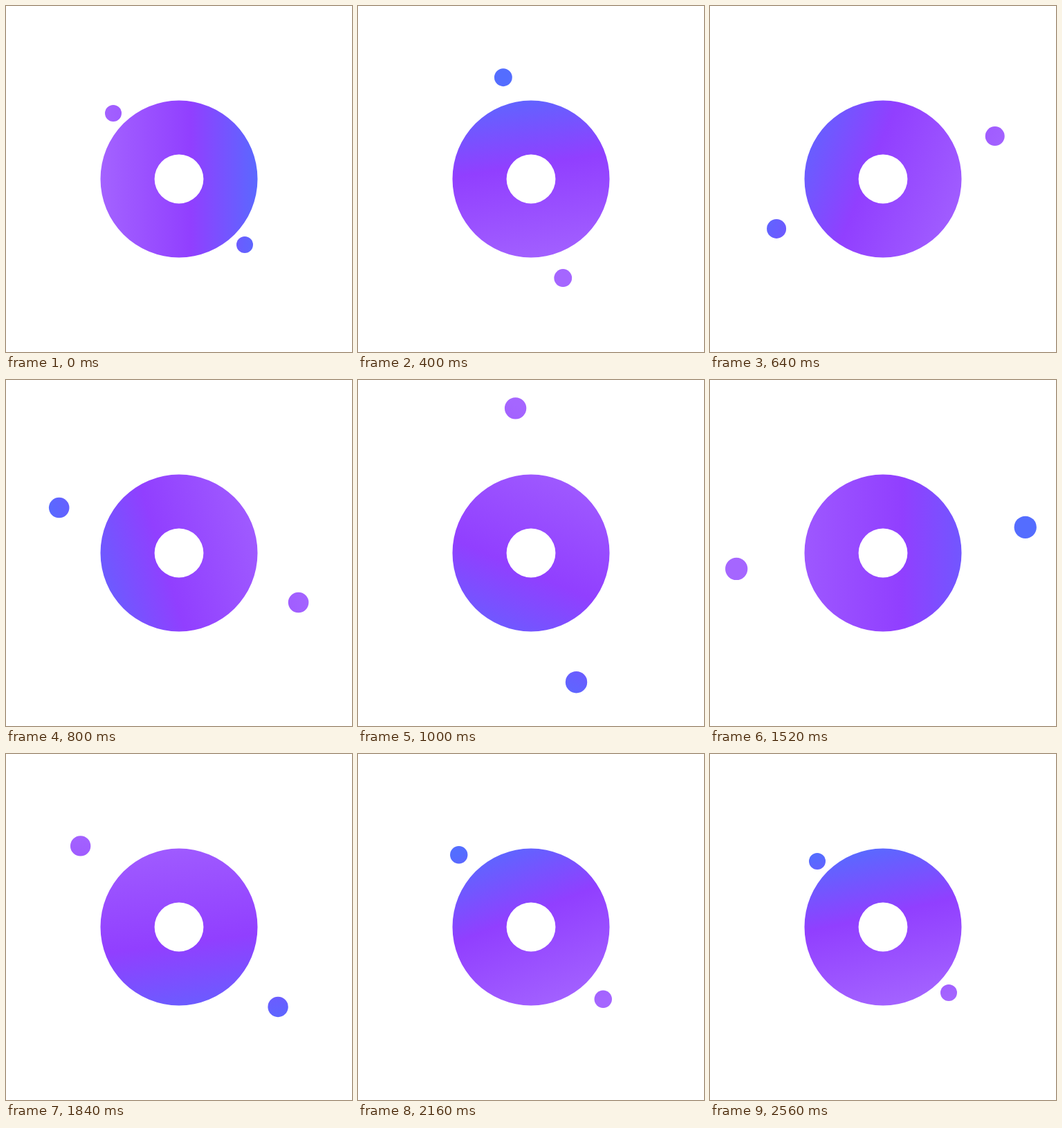
An HTML page with a canvas for the animation above (2.6 s loop, 500x500 px).

```html
<!DOCTYPE html>
<html lang="en">
<head>
<meta charset="utf-8">
<title>Orbiting ring</title>
<style>
  html, body { margin: 0; width: 100%; height: 100%; overflow: hidden; background: #fff; }
  canvas { display: block; width: 500px; height: 500px; }
</style>
</head>
<body>
<canvas id="stage" width="500" height="500"></canvas>
<script>
const ctx = document.getElementById('stage').getContext('2d');
const LOOP = 2600, STEP = 40, SIZE = 500, TAU = 2 * Math.PI;
const RING_OUTER = 113.5, RING_INNER = 35.4;
const REST_DISTANCE = 134.35, EXTRA_DISTANCE = 86;

const rad = degrees => degrees * Math.PI / 180;
const progress = (t, start, end) => Math.min(1, Math.max(0, (t - start) / (end - start)));
const smooth = x => x * x * (3 - 2 * x);
const cubicInOut = x => x < 0.5 ? 4 * x ** 3 : 1 - 4 * (1 - x) ** 3;

// The CSS "ease" curve, cubic-bezier(.25, .1, .25, 1), solved by bisection.
function ease(x) {
  const bezier = (u, p1, p2) => 3 * u * (1 - u) ** 2 * p1 + 3 * u * u * (1 - u) * p2 + u ** 3;
  let low = 0, high = 1;
  for (let i = 0; i < 24; i++) {
    const mid = (low + high) / 2;
    if (bezier(mid, 0.25, 0.25) < x) low = mid; else high = mid;
  }
  return bezier(low, 0.1, 1);
}

// Half a turn, then a full turn, while the dots swing out and back in.
function orbitAt(t) {
  const first = cubicInOut(progress(t, 0, 1175));
  const second = ease(progress(t, 884, 2029));
  const out = smooth(progress(t, 0, 1410));
  const back = progress(t, 1300, 2260) ** 1.5;
  return {
    turn: 180 * first + 360 * second,
    distance: REST_DISTANCE + EXTRA_DISTANCE * out * (1 - back),
    sway: 55 * (1 - second) * second ** 0.3 - 27 * first * (1 - first),
  };
}

// The colours turn steadily backwards once, then ease forwards.
const colorTurn = t => -360 * progress(t, 0, 1460) + 257 * cubicInOut(progress(t, 1460, 2340));

function gradientAt(degrees, reach) {
  const x = Math.cos(rad(degrees)) * reach, y = Math.sin(rad(degrees)) * reach;
  const gradient = ctx.createLinearGradient(-x, -y, x, y);
  gradient.addColorStop(0, '#a566ff');
  gradient.addColorStop(0.57, '#913fff');
  gradient.addColorStop(1, '#546dff');
  return gradient;
}

function disc(x, y, radius) {
  ctx.beginPath();
  ctx.arc(x, y, radius, 0, TAU);
  ctx.fill();
}

function draw(t) {
  const { turn, distance, sway } = orbitAt(t);
  ctx.setTransform(1, 0, 0, 1, 0, 0);
  ctx.fillStyle = '#fff';
  ctx.fillRect(0, 0, SIZE, SIZE);
  ctx.translate(SIZE / 2, SIZE / 2);
  ctx.fillStyle = gradientAt(colorTurn(t), 0.93 * distance);

  ctx.beginPath();
  ctx.arc(0, 0, RING_OUTER, 0, TAU);
  ctx.arc(0, 0, RING_INNER, 0, TAU);
  ctx.fill('evenodd');

  const radius = 12 + (distance - REST_DISTANCE) * 0.054;
  const axis = rad(45 + turn), drift = rad(120 + turn);
  for (const side of [-distance, distance]) {
    disc(side * Math.cos(axis) + sway * Math.cos(drift),
         side * Math.sin(axis) + sway * Math.sin(drift), radius);
  }
}

function tick() {
  const t = performance.now() % LOOP;
  draw(Math.floor(t / STEP) * STEP);
  requestAnimationFrame(tick);
}
tick();
</script>
</body>
</html>
```
